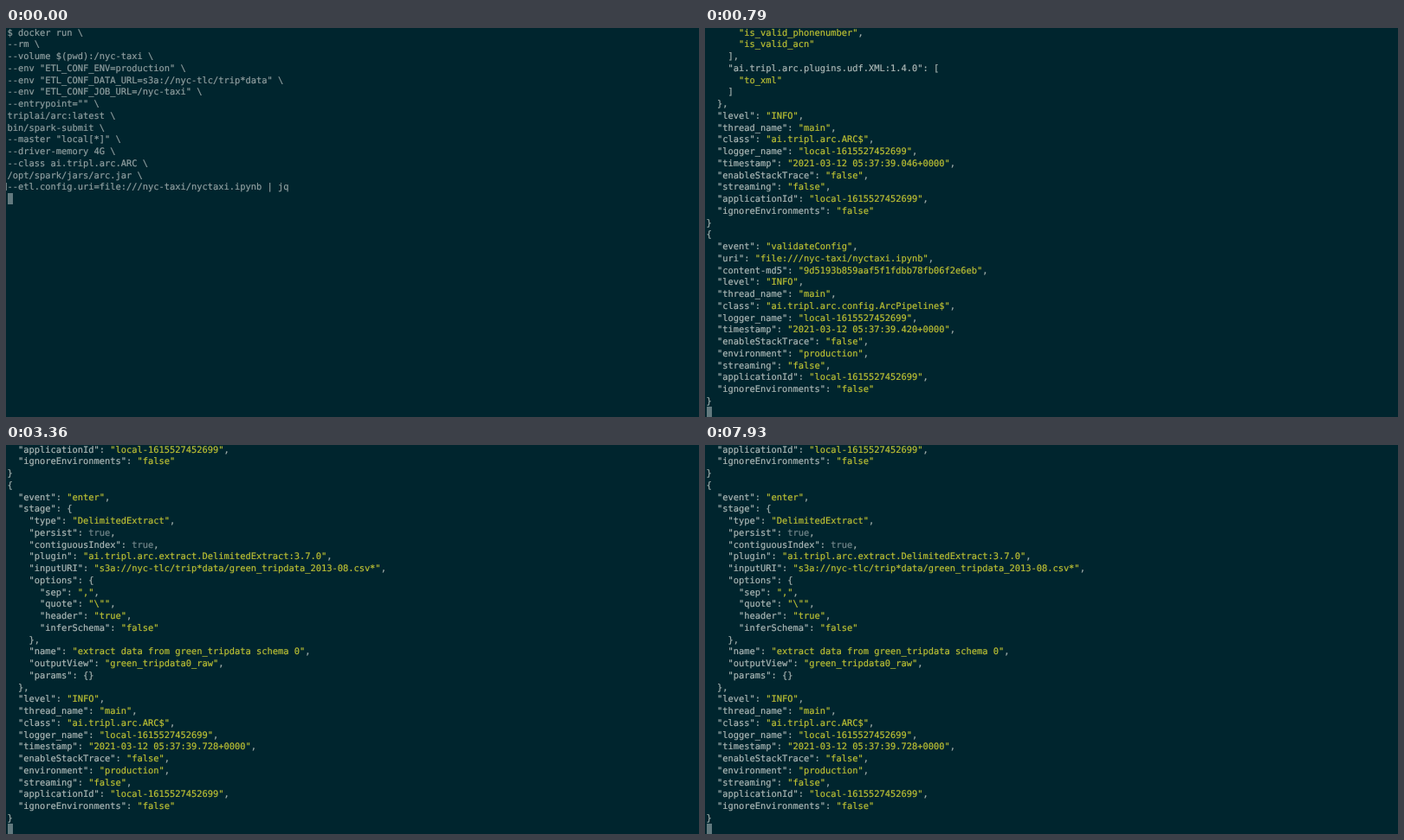
Animation, 800 px wide and 450 px high, one loop 8 s. Source, as an HTML page:

```html
<!DOCTYPE html>
<html lang="en">
<head>
<meta charset="utf-8">
<title>Terminal log</title>
<style>
  html, body { margin: 0; width: 100%; height: 100%; overflow: hidden; background: #00252e; }
  #stage { position: relative; width: 800px; height: 450px; overflow: hidden; }
  pre {
    position: absolute; left: 1.6px; top: -0.4px; margin: 0; visibility: hidden;
    font: 10.38px/13.75px "DejaVu Sans Mono", "Liberation Mono", monospace;
    text-rendering: geometricPrecision; font-variant-ligatures: none;
    -webkit-text-stroke: 0.2px currentColor;
    color: #a3b0ae;
  }
  pre.shell { color: #909fa0; }
  .key { color: #acb8b6; }
  .str { color: #bcc034; }
  .lit { color: #73878b; }
  #cursor { position: absolute; left: 2px; width: 6px; height: 13.5px; background: #62797e; }
  #mouse { position: absolute; left: 0; top: 179px; width: 1px; height: 9px; background: #6d7f82; }
</style>
</head>
<body>
<div id="stage"><div id="cursor"></div><div id="mouse"></div></div>
<script>
const LOOP = 8000, ROWS = 32, PITCH = 13.75, TOP = -1.6;
const stage = document.getElementById("stage");
const cursor = document.getElementById("cursor");
const mouse = document.getElementById("mouse");

const command = String.raw`$ docker run \
--rm \
--volume $(pwd):/nyc-taxi \
--env "ETL_CONF_ENV=production" \
--env "ETL_CONF_DATA_URL=s3a://nyc-tlc/trip*data" \
--env "ETL_CONF_JOB_URL=/nyc-taxi" \
--entrypoint="" \
triplai/arc:latest \
bin/spark-submit \
--master "local[*]" \
--driver-memory 4G \
--class ai.tripl.arc.ARC \
/opt/spark/jars/arc.jar \
--etl.config.uri=file:///nyc-taxi/nyctaxi.ipynb | jq`.split("\n");

// Fields that close every log record
const tail = (cls, time, env) => ({
  level: "INFO",
  thread_name: "main",
  class: "ai.tripl.arc." + cls,
  logger_name: "local-1615527452699",
  timestamp: `2021-03-12 05:37:${time}+0000`,
  enableStackTrace: "false",
  ...(env && { environment: env }),
  streaming: "false",
  applicationId: "local-1615527452699",
  ignoreEnvironments: "false"
});

const geo = ("IsRing PolygonFromEnvelope Area GeomFromGeoJSON InteriorRingN StartPoint " +
  "NumInteriorRings Envelope_Aggr PrecisionReduce MakeValid Boundary").split(" ");

const records = [
  {
    udf: {
      geo: geo.map(name => "ST_" + name),
      "ai.tripl.arc.plugins.udf.DataQuality:1.7.0":
        ["format_phonenumber", "is_valid_abn", "is_valid_phonenumber", "is_valid_acn"],
      "ai.tripl.arc.plugins.udf.XML:1.4.0": ["to_xml"]
    },
    ...tail("ARC$", "39.046")
  },
  {
    event: "validateConfig",
    uri: "file:///nyc-taxi/nyctaxi.ipynb",
    "content-md5": "9d5193b859aaf5f1fdbb78fb06f2e6eb",
    ...tail("config.ArcPipeline$", "39.420", "production")
  },
  {
    event: "enter",
    stage: {
      type: "DelimitedExtract",
      persist: true,
      contiguousIndex: true,
      plugin: "ai.tripl.arc.extract.DelimitedExtract:3.7.0",
      inputURI: "s3a://nyc-tlc/trip*data/green_tripdata_2013-08.csv*",
      options: { sep: ",", quote: '"', header: "true", inferSchema: "false" },
      name: "extract data from green_tripdata schema 0",
      outputView: "green_tripdata0_raw",
      params: {}
    },
    ...tail("ARC$", "39.728", "production")
  }
];

const span = (cls, text) => `<span class="${cls}">${text}</span>`;
const paint = line => line.replace(/("(?:\\.|[^"\\])*")(:?)|\btrue\b/g, (all, text, colon) =>
  text ? span(colon ? "key" : "str", text) + colon : span("lit", all));

function addView(at, lines, cls) {
  const el = document.createElement("pre");
  el.className = cls;
  el.innerHTML = (cls === "log" ? lines.map(paint) : lines).join("\n");
  stage.append(el);
  return { at, el, rows: lines.length };
}

// Each record scrolls the log at once; the screen keeps its last rows
const views = [addView(0, command, "shell")];
let log = [];
[500, 790, 1070].forEach((at, i) => {
  log = log.concat(JSON.stringify(records[i], null, 2).split("\n"));
  views.push(addView(at, log.slice(-ROWS), "log"));
});

function draw(now) {
  const t = now % LOOP;
  const view = views.filter(v => v.at <= t).pop();
  views.forEach(v => v.el.style.visibility = v === view ? "visible" : "hidden");
  cursor.style.top = TOP + view.rows * PITCH + "px";
  mouse.style.visibility = view === views[0] ? "visible" : "hidden";
}

const start = performance.now();
function tick() {
  draw(performance.now() - start);
  requestAnimationFrame(tick);
}
tick();
</script>
</body>
</html>
```
